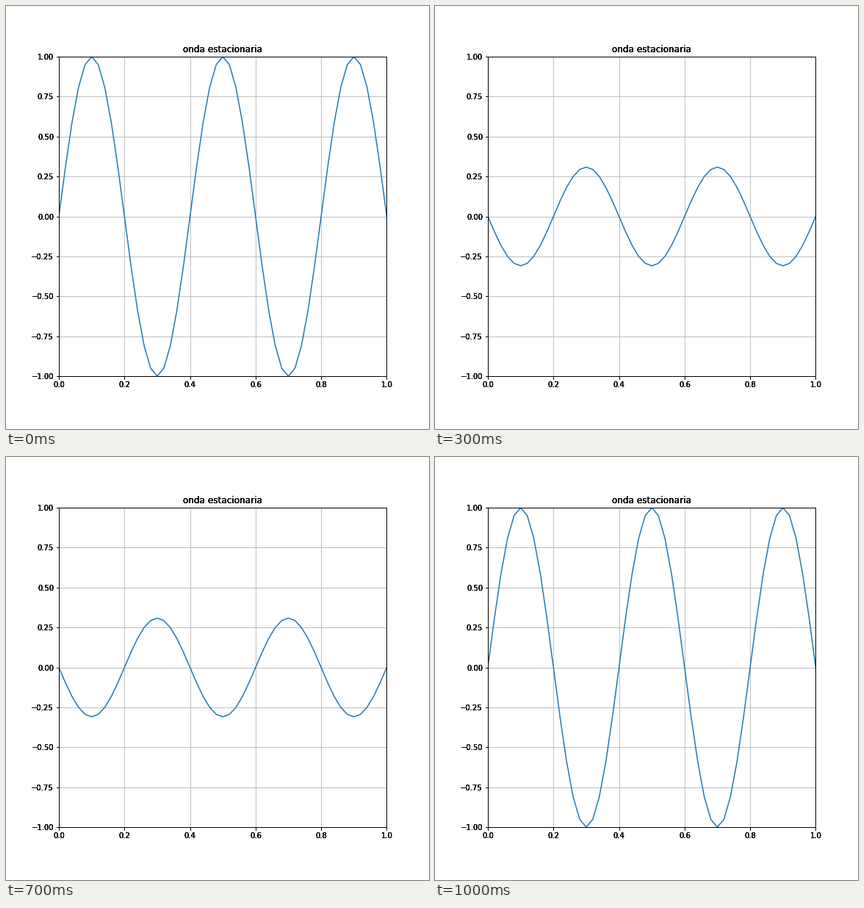
Animation of 576x576 px, one loop 1.05 s. Source, as a matplotlib script:

```python
import numpy as np
import matplotlib.pyplot as plt
from matplotlib.animation import FuncAnimation

FRAMES = 21
INTERVAL = 50
PERIOD = 20      # frames per oscillation
LAYERS = 4       # stacked labels give the heavy, hard-edged lettering

plt.rcParams.update({"font.family": "DejaVu Sans", "font.size": 10})

fig = plt.figure(figsize=(8, 8), dpi=72, facecolor="white")


def add_axes():
    ax = fig.add_axes([0.125, 0.125, 0.775, 0.755], facecolor="none")
    ax.set(xlim=(0, 1), ylim=(-1, 1))
    ax.set_title("onda estacionaria")
    return ax


ax = add_axes()
ax.grid(True)
for _ in range(LAYERS - 1):
    add_axes()

x = np.linspace(0, 1, 51)
shape = np.sin(5 * np.pi * x)
wave, = ax.plot(x, shape)


def update(i):
    wave.set_ydata(shape * np.cos(2 * np.pi * i / PERIOD))
    return wave,


anim = FuncAnimation(fig, update, frames=FRAMES, interval=INTERVAL,
                     repeat=True, repeat_delay=0, blit=False)
plt.show()
```
